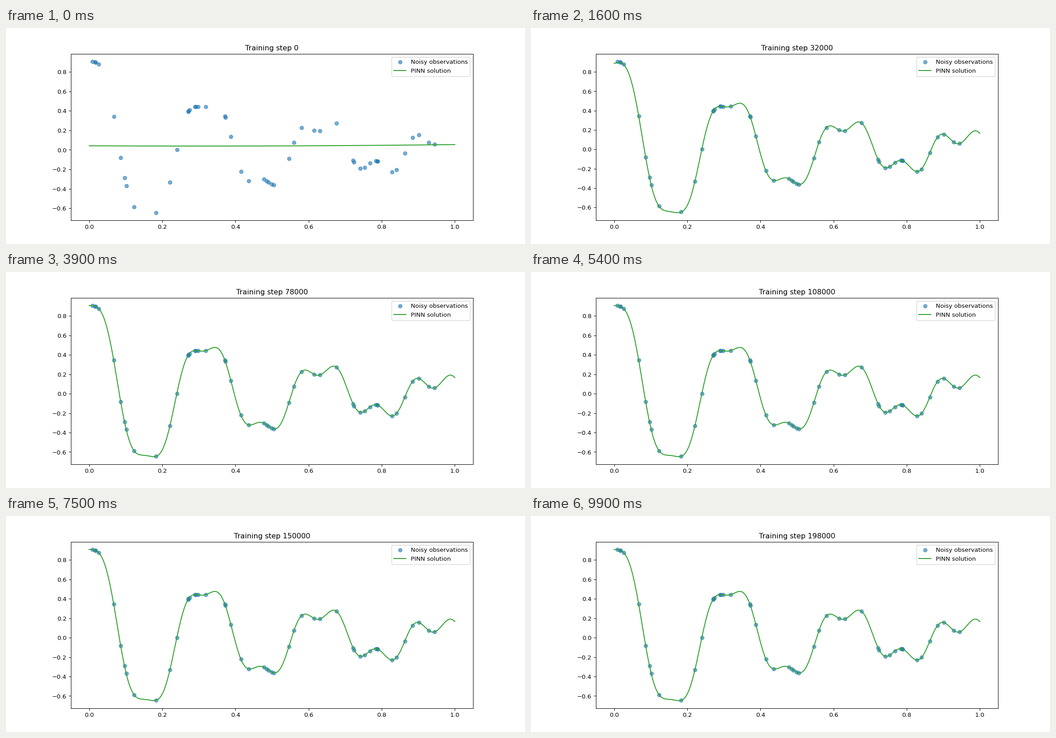
Animation, 1159 px wide and 483 px high, one loop 10 s. Source, as a matplotlib script:

```python
import numpy as np
import matplotlib.pyplot as plt
from matplotlib.animation import FuncAnimation

FRAMES, INTERVAL, STEP = 100, 100, 2000
DAMP, OMEGA = 2, 20


def signal(t):
    """Damped oscillator plus a steady ripple at three times its frequency."""
    w = np.sqrt(OMEGA ** 2 - DAMP ** 2)
    decay = np.exp(-DAMP * t) * (np.cos(w * t) + DAMP / w * np.sin(w * t))
    return decay - .092 * np.cos(3 * OMEGA * t + .05)


# Sampling times of the observations, in units of 1e-4
t_obs = np.array([
    84, 165, 175, 255, 671, 861, 966, 1014, 1226, 1830, 2208, 2398, 2704, 2715,
    2741, 2894, 2919, 2974, 3191, 3711, 3723, 3876, 4149, 4361, 4774, 4859,
    4908, 4988, 5049, 5462, 5602, 5804, 6147, 6313, 6760, 7220, 7247, 7412,
    7531, 7684, 7841, 7872, 7896, 8276, 8404, 8631, 8843, 9019, 9283,
    9446]) / 1e4
u_obs = signal(t_obs)

x = np.linspace(0, 1, 500)
final = signal(x)


def bump(center, width):
    return np.exp(-((x - center) / width) ** 2)


def blur(y, sigma):
    w = np.exp(-.5 * ((x[None, :] - x[:, None]) / sigma[:, None]) ** 2)
    return w @ y / w.sum(axis=1)


def solution(n):
    """Network output: detail spreads from left to right as training goes on."""
    if n == 0:
        return .039 + .031 * (x - .3) ** 2
    misfit = -.02 * bump(0, .011) - .009 * bump(.16, .022)
    y = final + misfit * min(1, np.exp((16 - n) / 4))
    front = .05 + .15 * n
    sigma = .001 + .25 / (1 + np.exp((front - x) / .05)) + .02 * np.exp(-n / 3)
    return blur(y, sigma)


fig, ax = plt.subplots(figsize=(11.997, 5), dpi=96.61)  # 1159 x 483 pixels
ax.scatter(t_obs, u_obs, alpha=.6, label="Noisy observations")
line, = ax.plot(x, solution(0), color="tab:green", label="PINN solution")
ax.set_xlim(-.05, 1.05)
ax.legend(loc="upper right")


def update(n):
    y = solution(n)
    line.set_ydata(y)
    lo, hi = min(y.min(), u_obs.min()), max(y.max(), u_obs.max())
    pad = .05 * (hi - lo)
    ax.set_ylim(lo - pad, hi + pad)
    ax.set_title(f"Training step {n * STEP}")
    return line,


anim = FuncAnimation(fig, update, frames=FRAMES, interval=INTERVAL,
                     repeat=True, repeat_delay=0)
plt.show()
```
